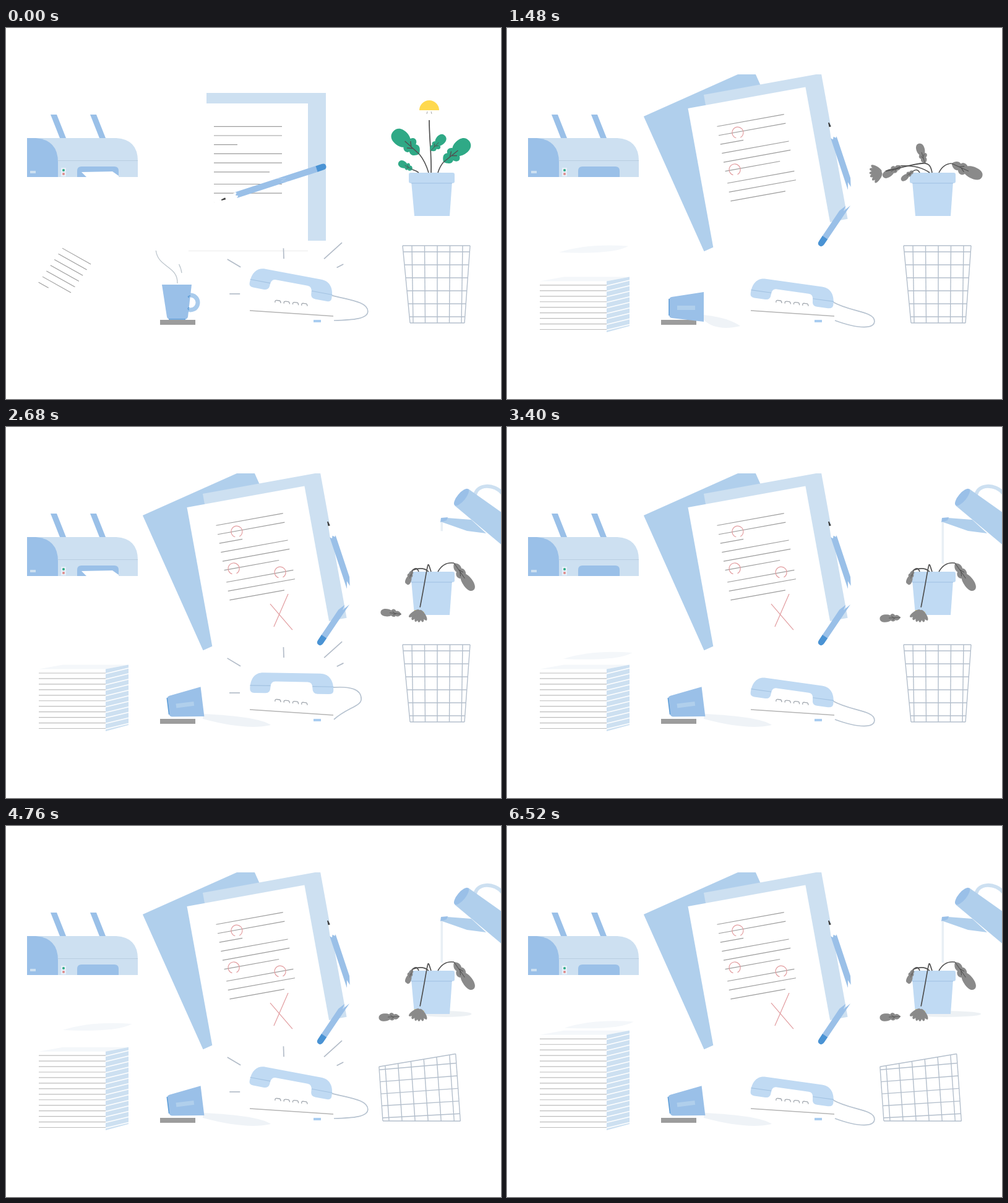
Write an HTML page with a canvas that moves like this. It is 800 px wide and 600 px high and loops after 6.56 s.

```html
<!DOCTYPE html>
<html lang="en">
<head>
<meta charset="utf-8">
<title>Office mishaps</title>
<style>
html, body { margin: 0; width: 100%; height: 100%; overflow: hidden; background: #fff; }
canvas { display: block; }
</style>
</head>
<body>
<canvas id="stage" width="800" height="600"></canvas>
<script>
const g = document.getElementById('stage').getContext('2d');
const LOOP = 6560, RAD = Math.PI / 180;
const PALE = '#cde0f1', SOFT = '#c0daf3', MILD = '#b0cfec', BLUE = '#9ac0e8', DEEP = '#4a93d4';
const GREY = '#9c9c9c', WIRE = '#b4bfcc', DARK = '#505050';
const GREEN = [47, 169, 134], WILTED = [138, 138, 138];
const { sin, cos, sqrt, PI } = Math;

const part = (t, a, b) => Math.max(0, Math.min(1, (t - a) / (b - a)));
const smooth = (t, a, b) => { const p = part(t, a, b); return p * p * (3 - 2 * p); };
const mix = (a, b, p) => a + (b - a) * p;
const lerp = (a, b, p) => a.map((v, i) => mix(v, b[i], p));
const rgb = c => `rgb(${c.map(Math.round)})`;

function fill(d, color) { g.fillStyle = color; g.fill(new Path2D(d)); }
function stroke(d, color, width = 1.3) {
  g.strokeStyle = color;
  g.lineWidth = width;
  g.stroke(new Path2D(d));
}
function at(x, y, deg, draw) {
  g.save();
  g.translate(x, y);
  g.rotate(deg * RAD);
  draw();
  g.restore();
}
function turned(cx, cy, deg, draw) {
  at(cx, cy, deg, () => { g.translate(-cx, -cy); draw(); });
}
function oval(x, y, rx, ry, color, deg = 0) {
  g.fillStyle = color;
  g.beginPath();
  g.ellipse(x, y, rx, ry, deg * RAD, 0, 7);
  g.fill();
}

// ---------- printer and paper stack ----------
const PRINT = 893, SHEET = 8.95;

function printer(t) {
  for (const x of [72, 136]) fill(`M${x} 140h10l15 38h-10z`, BLUE);
  fill('M34 178H178Q213 180 213 215V241H34z', PALE);
  fill('M34 178H48Q84 181 84 217V241H34z', BLUE);
  stroke('M84 214.5H213', '#b9cde0', 1);
  fill('M39 231h9v4h-9z', PALE);
  fill('M89 226h8v14h-8z', '#e6eff8');
  oval(93, 230, 2, 2, '#2fa986');
  oval(93, 236, 2, 2, '#e08a8a');
  fill('M115 241V231Q115 224 122 224H175Q182 224 182 231V241z', BLUE);
  if (t % PRINT < 200) fill('M122 233L172 232L182 239V241H130z', '#fff');
}

function stack(t) {
  // the first printed page drifting down
  const drift = part(t, 0, 360);
  g.globalAlpha = 1 - drift;
  for (let i = 0; i < 7; i++) {
    const w = i < 6 ? 46 : 16;
    stroke(`M${91 - 6.4 * i} ${356 + 9.2 * i + 50 * drift}l${w} ${w * .56}`, GREY, 1.1);
  }
  g.globalAlpha = 1;

  const count = Math.floor(8 * part(t, 0, 600) + 3 * part(t, 800, 2400) + 6 * part(t, 4250, 5250));
  const lid = 490 - SHEET * count;
  if (count) {
    fill(`M53 ${lid}H161V492H53z`, '#fff');
    fill(`M53 ${lid}L92 ${lid - 7}H198L161 ${lid}z`, '#f4f7fa');
    fill(`M161 ${lid}L198 ${lid - 7}V482L161 492z`, PALE);
  }
  for (let i = 0; i < count; i++) {
    const y = 487.5 - SHEET * i;
    stroke(`M53 ${y}H161`, '#bdbdbd', 1.2);
    stroke(`M161 ${y + 1}L198 ${y - 8}`, '#fff', 1.5);
  }

  const phase = t % PRINT, y = 245 + 4.65 * sqrt(phase), x = 146 + 6 * sin(phase / 110);
  if (phase > 200 && y < lid - 8)
    fill(`M${x - 57} ${y + 5}Q${x - 10} ${y - 10} ${x + 55} ${y - 5}Q${x + 30} ${y + 9} ${x - 57} ${y + 5}z`, '#f4f7fa');
}

// ---------- documents and pencil ----------
function mark(d, p, length) {
  if (!p) return;
  g.save();
  g.setLineDash([p * length, 999]);
  stroke(d, '#e29c9f', 1.2);
  g.restore();
}

function documents(t) {
  const swing = smooth(t, 860, 1240), folder = 'M324 105H517V344H324z';
  g.save();
  g.beginPath();
  g.rect(0, 75, 800, 286);
  g.clip();
  turned(361.6, 365.5, -24.1 * swing, () => fill(folder, swing ? MILD : PALE));
  turned(337.6, 140, -10.3 * swing, () => {
    fill(folder, PALE);
    fill('M295 122H488V360H295z', '#fff');
    if (!swing) stroke('M295 360.5H488', '#ececec', 1);
    const short = [38, 90, 90 * part(t, 0, 640)];
    for (let i = 0; i < 9; i++)
      stroke(`M336 ${159.3 + 14.7 * i + (i > 5 ? 5 : 0)}h${i % 3 == 2 ? short[(i - 2) / 3] : 110}`, GREY, 1.2);
    [[367, 175], [351.6, 233], [424.3, 252.4]].forEach(([x, y], i) =>
      mark(`M${x - 4} ${y + 8}A9 9 0 1 1 ${x + 3} ${y + 8.5}`, part(t, 400 + 700 * i, 680 + 700 * i), 52));
    mark('M399.4 299.7L427.3 347.4', part(t, 2100, 2280), 56);
    mark('M430.8 289L398.7 337', part(t, 2330, 2500), 58);
  });
  g.restore();
}

function pencil(t) {
  const p = smooth(t, 860, 1250), hop = 22 * sin(p * PI);
  const lean = -18, mid = 103, write = smooth(t, 0, 640);
  const x = 348 + 83 * write, y = 278 + 2 * write;
  const tip = lerp([x, y, lean], [520, 153, 71.6], p);
  const end = lerp([x + mid * cos(lean * RAD), y + mid * sin(lean * RAD), lean], [547, 290, 124], p);
  const jag = 'L96 -5L110 -1L101 1L113 5';
  at(tip[0], tip[1] - hop, tip[2], () => {
    fill('M0 0L28 -5V5z', '#fff');
    fill('M0 -.6L7 -1.6V1.6L0 1z', '#3c3c3c');
    fill(`M25 -5${jag}H25L28 2L24 0L27 -3z`, BLUE);
  });
  at(end[0], end[1] - hop, end[2], () => {
    g.translate(-mid, 0);
    fill(`M163 -5${jag}H163z`, BLUE);
    fill('M162 -5H172Q178 -5 178 0T172 5H162z', DEEP);
  });
}

// ---------- plant and watering can ----------
// each leaf goes from one pose to another: x, y, angle, length
const LEAVES = [
  { root: 683, bulge: -27, from: [668, 204, -138, 55], to: [656, 232, -246, 23] },
  { root: 698, bulge: 0, from: [707, 217, -39, 53], to: [724, 220, 55, 53] },
  { root: 667, bulge: 0, from: [657, 229, -151, 25], to: [657, 232, -250, 24] }
];

function leaf(x, y, deg, size, slim, fade) {
  at(x, y, deg, () => {
    g.scale(size / 56, size / 56 * slim);
    fill('M0 0C4 -8 9 -12 15 -8C17 -14 24 -13 27 -9C34 -16 57 -17 57 -1C57 16 34 14 28 9C25 17 17 15 15 8C9 12 4 7 0 0z',
      rgb(lerp(GREEN, WILTED, fade)));
    stroke('M0 0H32M14 0L22 -6M18 0L25 6', DARK, 1.5);
  });
}

function flower(t, wilt) {
  const turn = 169 * wilt ** 1.25, reach = 66 + 12 * wilt;
  const dx = -sin(turn * RAD), dy = -cos(turn * RAD);
  const x = 684 + reach * dx, y = 215 + reach * dy, pull = 30 + 50 * wilt;
  const stem = [[687, 234], [688 - 8 * wilt, 205 + 9 * wilt], [x - pull * dx, y - pull * dy], [x, y]];
  stroke(`M${stem[0]}C${stem.slice(1).join(' ')}`, DARK, 1.7);

  at(x, y, -turn, () => {
    const shut = smooth(wilt, .2, .6), lift = 16 - 10 * wilt;
    const shade = 255 - 117 * part(wilt, .1, .6);
    g.fillStyle = '#ffd94f';
    g.beginPath();
    g.arc(0, -lift, mix(16, 8, shut), PI, 0);
    g.fill();
    for (const side of [-1, 1])
      for (let i = 0; i < 3; i++)
        at(0, -lift * .6, side * mix(100 + i * 17, 8 + i * 18, shut), () => oval(0, -11, 3.4, 10, rgb([shade, shade, shade])));
    if (wilt < .1) stroke('M-3 -14L-4 -10M3 -14L4 -10', '#a5a5a5', 1);
  });

  // the leaf on this stem lets go and drops to the floor
  const u = .42, v = 1 - u, drop = part(t, 2100, 2700) ** 2;
  const on = [0, 1].map(k => v ** 3 * stem[0][k] + 3 * v * v * u * stem[1][k] + 3 * v * u * u * stem[2][k] + u ** 3 * stem[3][k]);
  leaf(...lerp(on, [636, 308], drop), -46 - 137 * smooth(t, 0, 3200), 33, 1 - .2 * wilt, part(wilt, .22, .55));
}

function plant(t) {
  const wet = part(t, 3900, 5200), wilt = smooth(t, 0, 2400);
  if (wet) oval(716 - 8 * wet, 304, 10 + 48 * wet, 5, '#edf1f4');
  fill('M655 248H721L717 304H660z', SOFT);
  fill('M651 237Q651 234 654 234H722Q725 234 725 237V248Q725 251 722 251H654Q651 251 651 248z', SOFT);
  stroke('M655 251H721', '#9fc1e4', 1.2);
  for (const { root, bulge, from, to } of LEAVES) {
    const [x0, y, deg, size] = lerp(from, to, wilt), x = x0 + bulge * sin(wilt * PI);
    stroke(`M${root} 234Q${mix(root, x, .35)} ${mix(y, 234, .4) - 8 * wilt} ${x} ${y}`, DARK, 1.6);
    leaf(x, y, deg, size, 1 - .35 * wilt, part(wilt, .02, .18));
  }
  flower(t, wilt);
}

function wateringCan(t) {
  const away = 1 - smooth(t, 1900, 2550), flow = part(t, 2600, 2960);
  fill(`M702.5 153h3.5v${68 * flow}h-3.5z`, '#e8eff5');
  if (away == 1) return;
  at(800 + 140 * away, 150 - 20 * away, 15 * away, () => {
    g.translate(-800, -150);
    stroke('M758 110C762 92 788 91 803 108', PALE, 6);
    fill('M703 147L713 147L752 150L776 172L745 168L705 154z', MILD);
    fill('M703 147L714 146L712 151L702 154z', BLUE);
    fill('M747 100L860 180L830 215L725 127z', MILD);
    oval(736, 113.5, 17, 6.5, BLUE, -50);
  });
}

// ---------- mug ----------
function mug(t) {
  fill('M249 472H306V480H249z', GREY);
  g.save();
  g.globalAlpha = 1 - part(t, 950, 1150);
  g.setLineDash([66, 44]);
  g.lineDashOffset = -t * .066;
  stroke('M277 413C278 383 242 388 242 355C242 341 250 332 259 328', '#bcc5cc');
  g.setLineDash([15, 20]);
  g.lineDashOffset = -17 - t * .066;
  stroke('M282 413C288 392 280 384 273 369', '#bcc5cc');
  g.restore();

  const spill = smooth(t, 1200, 1800), tip = smooth(t, 980, 1360);
  if (spill) {
    const end = 335 + 93 * spill;
    fill(`M318 464Q${end - 20} 468 ${end} 482Q${end - 40} 491 318 472z`, '#eff3f7');
  }
  at(277 - 15 * tip, 471 - 19 * tip, 90 * tip - 7 * smooth(t, 1480, 1700), () => {
    g.save();
    g.scale(1 - tip, 1);
    g.strokeStyle = '#a9cbec';
    g.lineWidth = 7;
    g.beginPath();
    g.arc(21, -27, 12, -2, 2);
    g.stroke();
    g.restore();
    fill('M-25 -56H23L17 -4Q16 0 12 0H-12Q-16 0 -17 -4z', BLUE);
    stroke('M-14 0H13', '#5f9ed8', 1.6);
    if (tip > .6) fill('M-3 -42H4V-13H-3z', MILD);
    else stroke('M21 -38Q15 -37 19 -35M19 -19Q15 -17 19 -15', '#5f9ed8', 1.4);
  });
}

// ---------- telephone ----------
const RINGS = [[0, 1050], [2455, 3300], [3860, 5900]];
const RAYS = [[180, 73, 17], [211, 84, 25], [268, 57, 17], [318, 85, 39], [333, 94, 12]]; // angle, distance, length

function phone(t) {
  const ring = RINGS.find(([from, to]) => t >= from && t < to);
  const swing = ring ? sin((t - ring[0]) / 300 * 2 * PI) : 0;
  const tilt = ring ? 10.5 + 9.5 * swing : 8, sag = ring ? tilt : 19;
  const x = 461.5, y = ring ? 414 : 428;

  if (ring) for (const [deg, far, length] of RAYS) {
    const r = far - 10 * Math.max(0, swing);
    at(451, 430, deg, () => stroke(`M${r} 0h${length}`, '#b3bcc8', 1.7));
  }

  const c = cos(tilt * RAD), s = sin(tilt * RAD);
  const sx = x + 67 * c - 6 * s, sy = y + 67 * s + 6 * c;
  const mx = 573 + 1.1 * sag, my = 438 + 1.9 * sag;
  stroke(`M${sx} ${sy}C${sx + 28} ${sy - 3 + sag} ${mx} ${my - 16} ${mx} ${my}` +
    `C${mx} ${my + 12} ${mx - 23} ${my + 14} 530 473`, '#b7c3d0', 1.7);

  for (let i = 0; i < 4; i++)
    stroke(`M${435 + i * 14.3} ${444 + i * 1.6}q-1 -4 3 -3.5l4 .5q2 .5 2 4`, '#a3a9b0', 1.3);
  stroke('M394 457L529 466', '#b4b4b4', 1.4);
  fill('M497 472H509V476H497z', '#a9cdf0');
  at(x, y, tilt, () => {
    fill('M-67 11C-67 -8 -58 -16 -46 -16H46C58 -16 68 -8 68 11Q68 17 60 17H42Q34 17 34 8Q34 -2 26 -2H-26Q-34 -2 -34 8Q-34 17 -42 17H-60Q-67 17 -67 11z', SOFT);
    stroke('M-67 5H-34M34 5H68', '#a3c3e2', 1.1);
  });
}

// ---------- basket ----------
function basket(t) {
  const rock = sin(PI * part(t, 460, 900)), fall = smooth(t, 3480, 3900);
  at(741 - 132 * fall, 477 - 6 * rock - 25 * sin(PI * fall), 86 * fall - 4 * rock, () => {
    const row = h => stroke(`M${-88 - h * .096} ${-h}H${h * .072}`, WIRE, 1.4);
    row(0);
    row(125);
    for (let h = 10; h < 125; h += 21) row(h);
    stroke('M-100 -125L-88 0M9 -125L0 0', WIRE, 1.4);
    for (let i = -2; i <= 2; i++) stroke(`M${-44 + 20.5 * i} -125L${-44 + 19.5 * i} 0`, WIRE, 1.4);
  });
}

const scene = [printer, stack, documents, pencil, plant, wateringCan, mug, phone, basket];
const start = performance.now();
function tick() {
  const t = (performance.now() - start) % LOOP;
  g.clearRect(0, 0, 800, 600);
  scene.forEach(draw => draw(t));
  requestAnimationFrame(tick);
}
tick();
</script>
</body>
</html>
```
